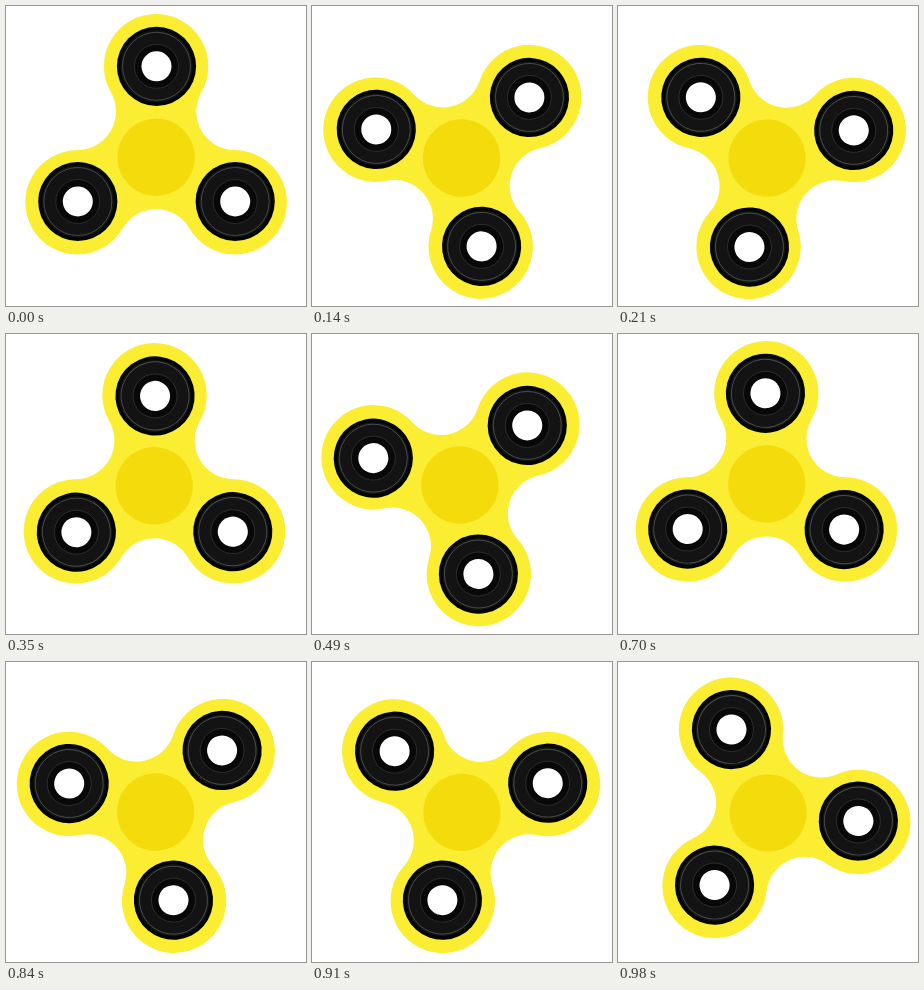
An HTML page that plays this animation: 300x300 px, repeating every 1050 ms.

```html
<!DOCTYPE html>
<html lang="en">
<head>
<meta charset="utf-8">
<title>Spinner</title>
<style>
  html, body { margin: 0; width: 100%; height: 100%; overflow: hidden; background: #fff; }
  svg { display: block; width: 100%; height: 100%; }
</style>
</head>
<body>
<svg viewBox="0 0 300 300">
  <defs>
    <g id="bearing">
      <circle r="39.6" fill="#030405"/>
      <circle r="36" fill="#131313"/>
      <circle r="34" fill="#131313" stroke="#4a4d4e" stroke-width=".9"/>
      <circle r="22" fill="#080808" stroke="#303233" stroke-width=".8"/>
      <circle r="15" fill="#fff"/>
    </g>
  </defs>
  <g id="spinner">
    <!-- the hub sits slightly off the pivot, so the spinner wobbles -->
    <g transform="translate(1.5 -.7)">
      <path transform="translate(-.4 .6)" fill="#faed32" d="M-45.3-64.8A52.2 52.2 0 1 1 45.3-64.8
        A38.7 38.7 0 0 0 78.8-6.8A52.2 52.2 0 1 1 33.5 71.6
        A38.7 38.7 0 0 0-33.5 71.6A52.2 52.2 0 1 1-78.8-6.8
        A38.7 38.7 0 0 0-45.3-64.8Z"/>
      <circle cx="-.4" cy="1" r="38.7" fill="#f4db0c"/>
      <use href="#bearing" y="-90"/>
      <use href="#bearing" x="78.7" y="45.2"/>
      <use href="#bearing" x="-78.7" y="45.2"/>
    </g>
  </g>
</svg>
<script>
  const STEP = 70, STEPS = 15;
  const spinner = document.getElementById('spinner');

  function draw(now) {
    const step = Math.floor(now / STEP) % STEPS;
    spinner.setAttribute('transform', `translate(149 151) rotate(${step * 360 / STEPS})`);
    requestAnimationFrame(draw);
  }
  draw(performance.now());
</script>
</body>
</html>
```
